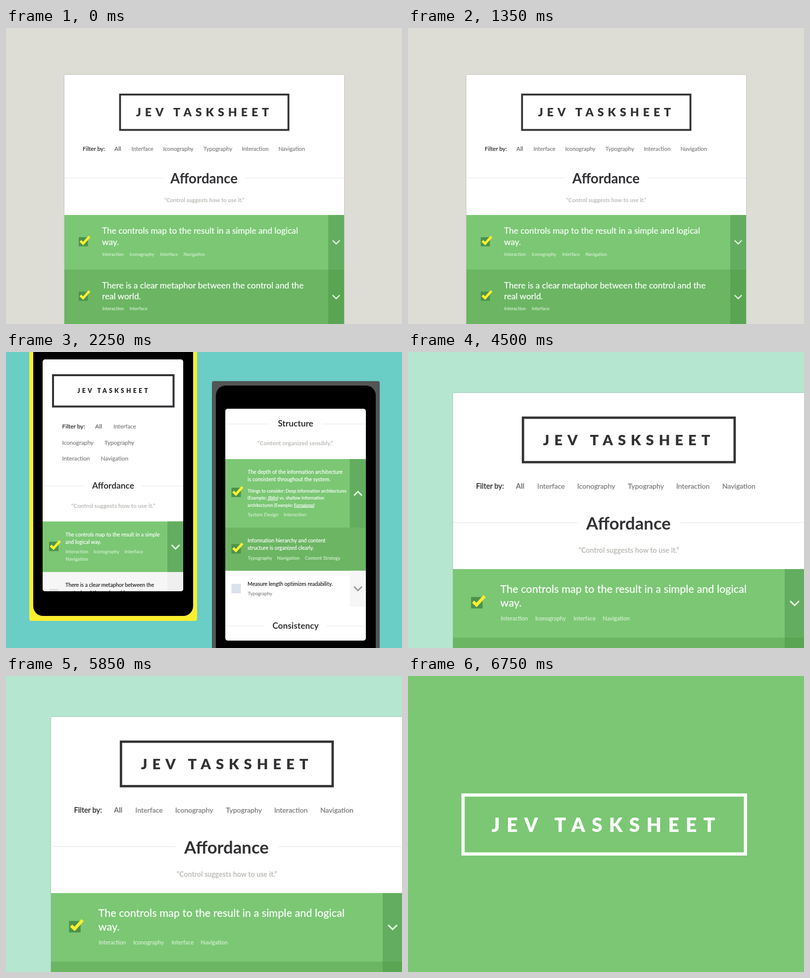
Animation, 800 px wide and 600 px high, one loop 9000 ms. Source, as an HTML page:

```html
<!DOCTYPE html>
<html lang="en">
<head>
<meta charset="utf-8">
<title>Checklist slides</title>
<style>
  html, body { margin: 0; width: 100%; height: 100%; overflow: hidden; }
  svg { display: block; width: 800px; height: 600px; font-family: Lato, "Open Sans", sans-serif; }
  .title { font-weight: 900; letter-spacing: .342em; stroke: none; }
  .bold { font-weight: 700; stroke: none; }
  .link { text-decoration: underline; }
</style>
</head>
<body>
<svg id="stage" viewBox="0 0 800 600"></svg>
<script>
const SLIDE_MS = 2250;
const GREEN = '#7bc774', DEEP = '#6bb563', STRIP = '#63ad60', DEEP_STRIP = '#5aa554';
const YELLOW = '#fcee2f', INK = '#333336', GREY = '#7a7a7a', PALE = '#bcbcb8', RULE = '#e6e8ee';
const TAG = '#d3edcf';

const rect = (x, y, w, h, fill, more = '') =>
  `<rect x="${x}" y="${y}" width="${w}" height="${h}" fill="${fill}" ${more}/>`;

// A hairline stroke gives regular text a slightly fuller weight
const text = (x, y, size, fill, str, more = '') =>
  `<text x="${x}" y="${y}" font-size="${size}" fill="${fill}" stroke="${fill}" stroke-width=".2" ${more}>${str}</text>`;

const centered = (x, y, size, fill, str) =>
  text(x, y, size, fill, str, 'class="bold" text-anchor="middle"');

// Words in one row, given as [x, word] pairs
const words = (y, size, fill, list) =>
  list.map(([x, str]) => text(x, y, size, fill, str)).join('');

// Shifted right to make up for the tracking after the last letter
const title = (x, y, size, fill) =>
  text(x + size * .125, y, size, fill, 'JEV TASKSHEET', 'class="title" text-anchor="middle"');

const frame = (x, y, w, h, color, line) =>
  rect(x + line / 2, y + line / 2, w - line, h - line, 'none', `stroke="${color}" stroke-width="${line}"`);

const rule = (x1, x2, y) => rect(x1, y - .5, x2 - x1, 1, RULE);

const tick = (x, y, size) =>
  rect(x, y, size, size, '#4c924d') +
  `<path transform="translate(${x} ${y}) scale(${size / 18.5})" d="M3.2 7.6L8.8 12.9L21.7 -1.4"
    fill="none" stroke="${YELLOW}" stroke-width="5"/>`;

// A positive h points down, a negative one up
const chevron = (x, y, w, h, line, color = '#e8f5e6') =>
  `<path d="M${x - w} ${y - h / 2}L${x} ${y + h / 2}L${x + w} ${y - h / 2}"
    fill="none" stroke="${color}" stroke-width="${line}"/>`;

function page() {
  return rect(118, 95, 565, 560, '#fff', 'rx="2" filter="url(#shadow)"') +
    frame(228.5, 133, 344, 75.5, INK, 3.8) +
    title(398, 179, 23.2, INK) +
    text(155, 249, 11.7, '#222', 'Filter by:') +
    text(219, 249, 11.5, '#707070', 'All', 'class="bold"') +
    words(249, 11.3, GREY, [[253.5, 'Interface'], [317.5, 'Iconography'], [399, 'Typography'],
      [476.5, 'Interaction'], [550.5, 'Navigation']]) +
    rule(118, 318, 304) + rule(483, 683, 304) +
    centered(400, 315, 27.6, INK, 'Affordance') +
    centered(400.5, 352.5, 11.3, PALE, '“Control suggests how to use it.”') +
    rect(118, 379, 565, 111, GREEN) + rect(651, 379, 32, 111, STRIP) +
    rect(118, 489.5, 565, 111, DEEP) + rect(651, 489.5, 32, 111, DEEP_STRIP) +
    tick(147, 424, 18.5) + tick(147, 534.5, 18.5) +
    chevron(667, 434, 7.2, 7, 2.4) + chevron(667, 545, 7.2, 7, 2.4) +
    text(194, 417, 17.25, '#fff', 'The controls map to the result in a simple and logical') +
    text(194, 439.5, 17.25, '#fff', 'way.') +
    words(461.5, 9.15, TAG, [[194.5, 'Interaction'], [250, 'Iconography'], [311.5, 'Interface'], [358.5, 'Navigation']]) +
    text(194, 528, 17.15, '#fff', 'There is a clear metaphor between the control and the') +
    text(194, 550, 17.15, '#fff', 'real world.') +
    words(572, 9.15, TAG, [[194.5, 'Interaction'], [250, 'Interface']]);
}

const phone = (x, y, height, color, content) =>
  rect(x, y, 339, height, color, 'rx="4"') +
  rect(x + 8, y + 9, 323, height - 19, '#000', 'rx="20"') +
  `<g transform="translate(${x + 27} ${y + 56})" clip-path="url(#screen)">` +
  rect(0, 0, 284, 470, '#fff') + content + '</g>';

// Phone contents are placed relative to the screen's corner
function topScreen() {
  return frame(19, 30, 247.5, 67.5, INK, 4) +
    title(142, 68, 12.3, '#222') +
    text(39.5, 140, 12, '#222', 'Filter by:') +
    text(106, 140, 12, '#707070', 'All', 'class="bold"') +
    text(143, 140, 11.7, GREY, 'Interface') +
    words(172.5, 11.7, GREY, [[39.5, 'Iconography'], [125, 'Typography']]) +
    words(205, 11.7, GREY, [[39.5, 'Interaction'], [117.5, 'Navigation']]) +
    rule(0, 85, 256.5) + rule(200, 284, 256.5) +
    centered(142.5, 262, 17.3, INK, 'Affordance') +
    centered(142.5, 300.5, 11.86, PALE, '“Control suggests how to use it.”') +
    rect(0, 328.5, 284, 102.5, GREEN) + rect(252, 328.5, 32, 102.5, STRIP) +
    tick(13, 369.5, 19) + chevron(268.5, 380, 8, 8, 2.7) +
    text(46, 358.5, 10.55, '#fff', 'The controls map to the result in a simple') +
    text(46, 373.5, 10.55, '#fff', 'and logical way.') +
    words(393, 9.6, TAG, [[46.5, 'Interaction'], [103, 'Iconography'], [165.5, 'Interface']]) +
    text(46.5, 408, 9.6, TAG, 'Navigation') +
    rect(0, 431, 284, 40, '#f6f6f6') + rect(252, 431, 32, 40, '#efefef') +
    rect(13, 465.5, 19, 19, '#dfe1e4') +
    text(46, 461, 10.65, '#222', 'There is a clear metaphor between the') +
    text(46, 476.5, 10.65, '#222', 'control and the real world.');
}

function structureScreen() {
  const link = str => `<tspan class="link">${str}</tspan>`;
  return rule(0, 90, 31) + rule(195, 284, 31) +
    centered(142, 36, 17.3, INK, 'Structure') +
    centered(141.5, 74, 11.86, PALE, '“Content organized sensibly.”') +
    rect(0, 102, 284, 139, GREEN) + rect(251.5, 102, 32.5, 139, STRIP) +
    rect(0, 241, 284, 87.5, DEEP) + rect(251.5, 328.5, 32.5, 72.5, '#f6f6f6') +
    tick(12.5, 160, 19) + tick(12.5, 274.5, 19) + rect(12.5, 355, 19, 19, '#dbe2ec') +
    chevron(268, 172, 8, -8, 2.7) + chevron(268, 364.5, 8, 8, 2.7, '#999') +
    text(45, 132, 10.55, '#fff', 'The depth of the information architecture') +
    text(45, 147, 10.55, '#fff', 'is consistent throughout the system.') +
    text(45, 169.5, 9, '#fff', 'Things to consider: Deep information architectures') +
    text(45, 184, 9, '#fff', `(Example: ${link('Jibliv')}) vs. shallow information`) +
    text(45, 198.5, 9, '#fff', `architectures (Example: ${link('Fernalope')})`) +
    words(217.5, 9.6, TAG, [[45.5, 'System Design'], [118, 'Interaction']]) +
    text(45, 271, 10.55, '#fff', 'Information hierarchy and content') +
    text(45, 286, 10.55, '#fff', 'structure is organized clearly.') +
    words(305.5, 9.6, TAG, [[45.5, 'Typography'], [104.5, 'Navigation'], [161, 'Content Strategy']]) +
    text(45, 358.5, 10.55, '#222', 'Measure length optimizes readability.') +
    text(45.5, 377.5, 9.6, '#888', 'Typography') +
    rule(0, 79, 440.5) + rule(204.5, 284, 440.5) +
    centered(142, 446, 17.3, INK, 'Consistency');
}

const zoom = 1.257;
const slides = [
  ['#dddcd5', page()],
  ['#6acdc6', phone(47, -41, 586, YELLOW, topScreen()) + phone(416, 59, 586, '#525655', structureScreen())],
  ['#b5e6cf', `<g transform="translate(${91 - 118 * zoom} ${83 - 95 * zoom}) scale(${zoom})">${page()}</g>`],
  [GREEN, frame(108, 238, 577, 126, '#fff', 6.5) + title(396.5, 316, 39, '#fff')]
];

const stage = document.getElementById('stage');
stage.innerHTML = `<defs>
  <clipPath id="screen"><rect width="284" height="470" rx="5"/></clipPath>
  <filter id="shadow"><feDropShadow dx="0" dy="0" stdDeviation="1" flood-opacity=".25"/></filter>
  </defs>` + slides.map(([fill, body]) => `<g class="slide">${rect(0, 0, 800, 600, fill)}${body}</g>`).join('');

const groups = [...stage.querySelectorAll('.slide')];
function draw() {
  const now = Math.floor(performance.now() / SLIDE_MS) % groups.length;
  groups.forEach((g, i) => g.style.display = i === now ? '' : 'none');
  requestAnimationFrame(draw);
}
draw();
</script>
</body>
</html>
```
